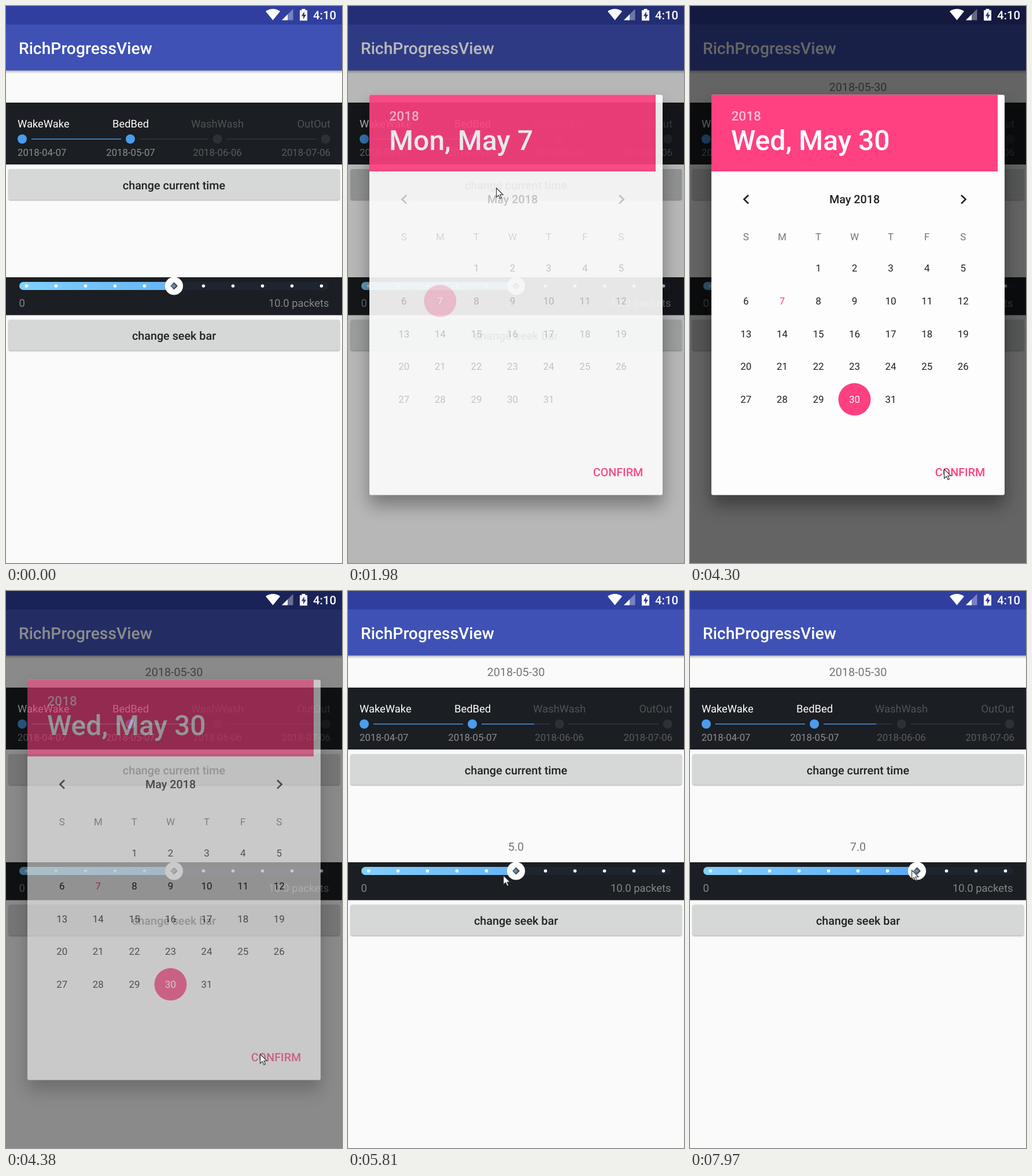
An HTML page that plays this animation: 581x963 px, repeating every 8 s.

```html
<!DOCTYPE html>
<html lang="en">
<head>
<meta charset="utf-8">
<title>RichProgressView</title>
<style>
html, body { margin: 0; width: 100%; height: 100%; overflow: hidden; background: #fafafa; }
svg { display: block; width: 581px; height: 963px; font-family: Roboto, sans-serif; text-rendering: geometricPrecision; }
.card { filter: drop-shadow(0 18px 15px rgba(0, 0, 0, .38)); }
.key { filter: drop-shadow(0 1.5px 1px rgba(0, 0, 0, .35)); }
</style>
</head>
<body>
<svg id="stage" viewBox="0 0 581 963"></svg>
<script>
const LOOP = 8000;
const SP = 1.413; // pixels per scaled unit
const PINK = '#ff4081', INK = '#212121';

// [first change, last change, number of changes]
const BURSTS = [
  [590, 1290, 10], [1440, 1520, 2], [1830, 2130, 5], [2360, 2590, 4],
  [2760, 3370, 9], [3540, 4070, 8], [4300, 5080, 11], [5160, 5550, 6],
  [5810, 6410, 9], [6560, 7110, 8], [7350, 7970, 9],
];

// Tracks: [time, value, ...]
const POINTER = [
  [590, 420, 807], [670, 393, 690], [900, 270, 330], [1060, 208, 176], [1140, 203, 200],
  [1290, 238, 342], [1365, 238, 342], [1520, 256, 314],
  [2283, 256, 314], [2590, 312, 544],
  [2684, 312, 544], [2910, 341, 590], [3140, 322, 645], [3370, 283, 674],
  [3540, 283, 674], [3700, 330, 715], [3990, 435, 803], [4070, 439, 800],
  [4534, 439, 800], [4612, 425, 782], [4690, 382, 715], [4768, 345, 640], [4930, 316, 555], [5080, 305, 514],
  [5082, 305, 514], [5550, 286, 490],
  [5732, 286, 491], [5890, 250, 491], [6250, 112, 488], [6410, 84, 488],
  [6482, 84, 488], [6717, 77, 488], [6900, 48, 486], [7110, 27, 485],
  [7272, 27, 485], [7510, 110, 486], [7820, 335, 483], [7970, 383, 482],
];
const SCRIM = [[1830, 0], [1905, .1], [1980, .27], [2055, .47], [2130, .6], [4300, .6], [4378, .45], [4456, .2], [4530, 0]];
const DIALOG = [[1830, 0], [1905, .4], [1980, .905], [2055, 1], [4300, 1], [4378, .55], [4456, .12], [4530, 0]];
const CALENDAR = [[1905, 0], [1980, .25], [2055, .7], [2130, 1]];
const PRESS = [[1755, 0], [1830, .08], [1980, .08], [2130, 0]];

const label = (str, x, midY, sp, fill, { weight = 400, anchor = 'start', id = '' } = {}) =>
  `<text ${id && `id="${id}"`} x="${x}" y="${midY + sp * SP * .355}" font-size="${sp * SP}" font-weight="${weight}" text-anchor="${anchor}" fill="${fill}">${str}</text>`;
const rect = (x, y, w, h, fill, extra = '') =>
  `<rect x="${x}" y="${y}" width="${w}" height="${h}" fill="${fill}" ${extra}/>`;
const circle = (x, y, r, fill, extra = '') =>
  `<circle cx="${x}" cy="${y}" r="${r}" fill="${fill}" ${extra}/>`;
const list = (n, draw) => Array.from({ length: n }, (_, i) => draw(i)).join('');
const mid = { anchor: 'middle' }, boldMid = { anchor: 'middle', weight: 500 };

const button = (str, y) =>
  rect(4.5, y, 572.5, 53, '#d6d7d7', 'rx="3" class="key"') + label(str, 290.5, y + 27.5, 14, INK, boldMid);

function milestones() {
  const stops = [
    ['WakeWake', '2018-04-07', 28, 20, 'start'], ['BedBed', '2018-05-07', 215, 215.5, 'middle'],
    ['WashWash', '2018-06-06', 365.7, 365.5, 'middle'], ['OutOut', '2018-07-06', 552.8, 561, 'end'],
  ];
  return rect(0, 167, 581, 107, '#1b1e22') +
    rect(44, 229, 155, 2, '#3f78b5') + rect(231, 229, 118.5, 2, '#2c2f33') + rect(381.5, 229, 155.5, 2, '#2c2f33') +
    rect(231, 229, 91, 2, '#3f78b5', 'id="reached"') +
    stops.map(([name, date, dotX, x, anchor], i) =>
      label(name, x, 203, 13, i < 2 ? '#fff' : '#505356', { anchor }) +
      circle(dotX, 230, 8, i < 2 ? '#4a9cee' : '#2d3035') +
      label(date, x, 253.5, 11.85, i < 2 ? '#8d8f90' : '#5a5c5f', { anchor })).join('');
}

const tickX = i => 35.5 + 51 * i;

function seekBar() {
  return rect(0, 469, 581, 65.5, '#1b1e22') +
    rect(23, 477, 535.5, 14, '#1e2530', 'rx="7"') +
    rect(23, 477, 100, 14, 'url(#sky)', 'rx="7" id="filled"') +
    list(11, i => circle(tickX(i), 484, 2.8, '#fff')) +
    `<g id="thumb">${circle(0, 484, 15.6, '#fff')}
      <path d="M0 477.5l6.5 6.5-6.5 6.5-6.5-6.5z" fill="url(#gem)"/><path d="M0 480.5l3.5 3.5-3.5 3.5-3.5-3.5z" fill="#7c8a99"/></g>` +
    label('0', 22.5, 513, 13, '#85878a') + label('10.0 packets', 558.5, 513, 13, '#85878a', { anchor: 'end' });
}

const dayX = column => 96.7 + 62.6 * column;
const dayY = row => 453.3 + 56.7 * row;

function calendar() {
  const days = list(31, i => {
    const cell = i + 2;
    return label(i + 1, dayX(cell % 7), dayY(Math.floor(cell / 7)), 12, INK, { ...mid, id: 'day' + (i + 1) });
  });
  const chevrons = `<path d="M101 327l-7.5 7.3 7.5 7.3M469 327l7.5 7.3-7.5 7.3" fill="none" stroke="${INK}" stroke-width="2.7"/>`;
  return chevrons + label('May 2018', 284.6, 334.3, 14, INK, boldMid) +
    [...'SMTWTFS'].map((d, i) => label(d, dayX(i), 399.3, 12, '#757575', mid)).join('') +
    circle(0, 0, 28, PINK, 'id="picked"') + days;
}

const statusIcons = `<g fill="#fff">
  <path d="M461.5 24.5L449 9.2Q461.5 .8 474 9.2z"/>
  <path d="M477 24.5L496.500 5v19.500z" opacity=".35"/><path d="M477 24.5l10-10v10z"/>
  <path d="M511.500 5h6v2.200h3.500v18h-13v-18h3.500z"/>
  <path d="M515.800 9.500l-5 8h3.200v5.500l5-8h-3.200z" fill="#2c3a92"/></g>` +
  label('4:10', 551, 16, 14.4, '#fff', boldMid);

stage.innerHTML = `<defs>
    <linearGradient id="sky" gradientUnits="userSpaceOnUse" x1="23" x2="558"><stop stop-color="#82d0fb"/><stop offset="1" stop-color="#4a98ef"/></linearGradient>
    <linearGradient id="gem"><stop stop-color="#4a8fd0"/><stop offset=".6" stop-color="#3e444c"/></linearGradient>
    <linearGradient id="fade" x2="0" y2="1"><stop stop-opacity=".28"/><stop offset="1" stop-opacity="0"/></linearGradient>
  </defs>` +
  rect(0, 0, 581, 963, '#fafafa') + rect(0, 111, 581, 6, 'url(#fade)') +
  rect(0, 0, 581, 32, '#303f9f') + rect(0, 32, 581, 79.5, '#3f51b5') +
  label('RichProgressView', 22, 72.5, 20, '#fff', { weight: 500 }) +
  label('2018-05-30', 290.5, 140, 14, '#757575', { ...mid, id: 'currentDate' }) +
  milestones() + button('change current time', 282) + rect(4.5, 282, 572.5, 53, '#000', 'rx="3" id="press"') +
  label('', 290.5, 442, 14, '#757575', { ...mid, id: 'amount' }) +
  seekBar() + button('change seek bar', 542.5) +
  rect(0, 0, 581, 963, '#000', 'id="scrim"') + statusIcons +
  `<g id="dialog"><g class="card">${rect(37, 153.5, 507, 692, '#fdfdfd', 'rx="3"')}</g>` +
  `<path d="M37 286V156.500a3 3 0 0 1 3-3h492V286z" fill="${PINK}"/>` +
  label('2018', 71.5, 190, 16, '#ffc3d7', { weight: 500 }) +
  label('', 71, 232, 34, '#fff', { weight: 500, id: 'headline' }) +
  `<g id="month">${calendar()}</g>` + label('CONFIRM', 467, 806, 14, PINK, boldMid) + '</g>' +
  '<path id="pointer" d="M.6 .8V16.600l3.700-3.500 2.700 6 2.500-1.100-2.600-5.700h5.200z" fill="#fff" stroke="#2b2b2b" stroke-width="1.100"/>';

const $ = id => document.getElementById(id);
const set = (id, name, value) => $(id).setAttribute(name, value);

// The picture holds still between discrete updates.
function heldTime(t) {
  let held = 0;
  for (const [start, end, count] of BURSTS) {
    if (t < start) break;
    const step = (end - start) / (count - 1);
    held = Math.min(end, start + Math.floor((t - start) / step + .1) * step);
  }
  return held;
}

function sample(track, t) {
  const next = track.findIndex(key => key[0] > t);
  if (next === 0) return track[0].slice(1);
  if (next < 0) return track.at(-1).slice(1);
  const a = track[next - 1], b = track[next];
  const p = (t - a[0]) / (b[0] - a[0]);
  return a.slice(1).map((v, i) => v + (b[i + 1] - v) * p);
}

function render(now) {
  const t = heldTime(now % LOOP);
  const [x, y] = sample(POINTER, t);
  set('pointer', 'transform', `translate(${x} ${y})`);
  set('pointer', 'opacity', t < 590 ? 0 : 1);

  set('scrim', 'opacity', sample(SCRIM, t)[0]);
  set('dialog', 'opacity', sample(DIALOG, t)[0]);
  set('month', 'opacity', sample(CALENDAR, t)[0]);
  set('press', 'opacity', sample(PRESS, t)[0]);

  const chosen = t >= 3540;
  $('headline').textContent = chosen ? 'Wed, May 30' : 'Mon, May 7';
  set('picked', 'cx', dayX(chosen ? 3 : 1));
  set('picked', 'cy', dayY(chosen ? 4 : 1));
  set('day7', 'fill', chosen ? PINK : '#fff');
  set('day30', 'fill', chosen ? '#fff' : INK);

  const confirmed = t >= 4300 ? 1 : 0;
  set('currentDate', 'opacity', confirmed);
  set('reached', 'opacity', confirmed);

  const dragging = t >= 5810;
  const value = dragging ? Math.max(0, Math.round((x - 31) / 51)) : 5;
  $('amount').textContent = dragging ? value.toFixed(1) : '';
  set('thumb', 'transform', `translate(${tickX(value)} 0)`);
  set('filled', 'width', tickX(value) - 23);
}

function tick() {
  render(performance.now());
  requestAnimationFrame(tick);
}
tick();
</script>
</body>
</html>
```
